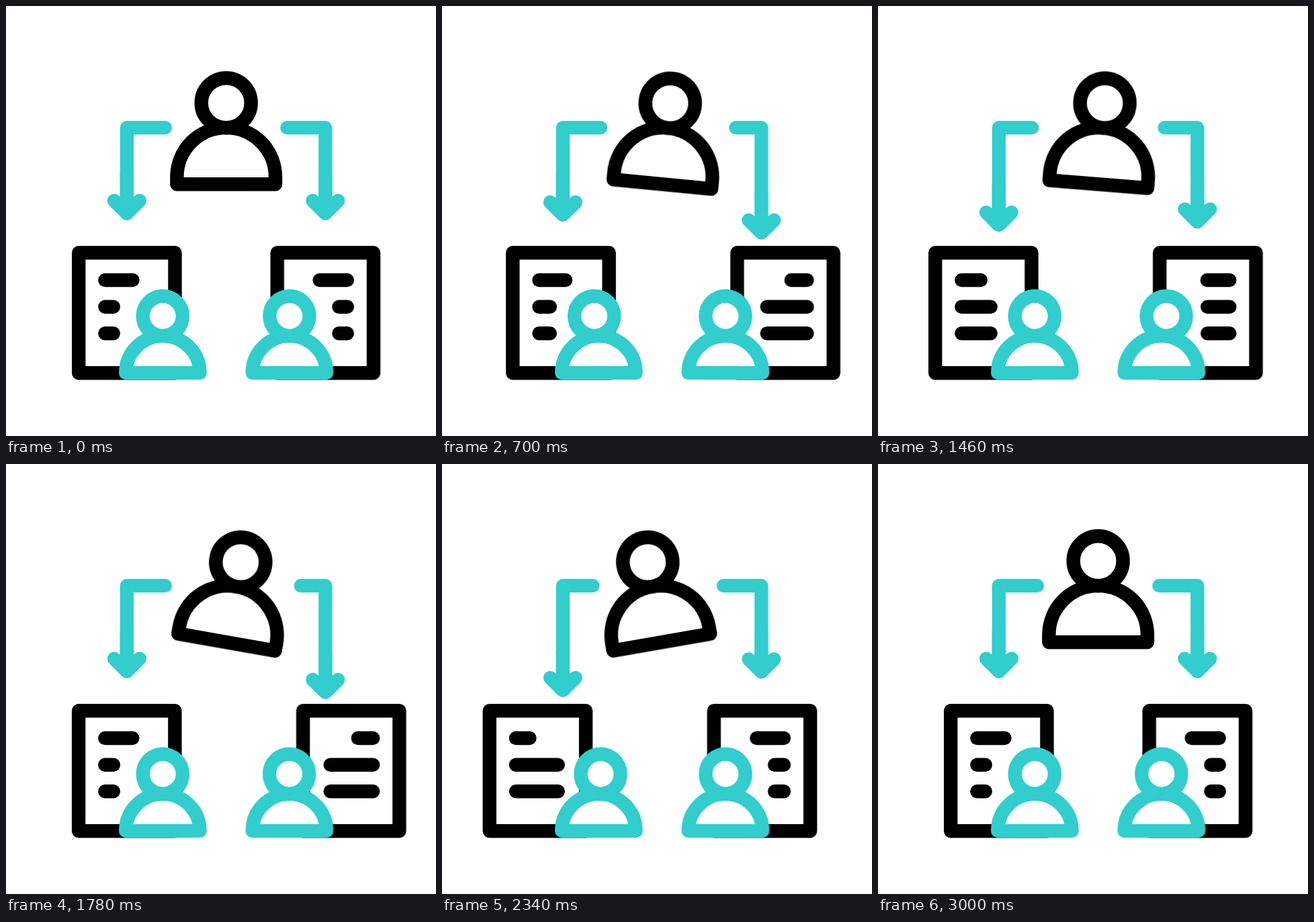
These frames come from a looping animation (640x640 px, 3020 ms). An HTML page:

```html
<!DOCTYPE html>
<html lang="en">
<head>
<meta charset="utf-8">
<title>Delegation</title>
<style>
  @property --k { syntax: "<number>"; inherits: true; initial-value: 0; }
  @property --nod { syntax: "<number>"; inherits: true; initial-value: 0; }

  html, body { margin: 0; width: 100%; height: 100%; overflow: hidden; background: #fff; }
  svg { display: block; width: 100%; height: 100%; }

  path, circle, rect {
    fill: none;
    stroke: #000;
    stroke-width: 20.4;
    stroke-linecap: round;
    stroke-linejoin: round;
  }
  .teal > * { stroke: #32cdcd; }
  .filled > * { fill: #fff; }

  /* --k: how far a side is extended, --nod: sideways shift of its head */
  .side { animation: extend 3.02s infinite, nod 3.02s infinite; }
  .side, .boss, .side * { animation-timing-function: cubic-bezier(.3333, 0, .6667, 1); }
  .left { --arm: 12.8px; --drop: 29.2px; --trim: 21.2px; --grow: 51.8px; animation-delay: -2.42s; }
  .right { --arm: 20.5px; --drop: 31.4px; --trim: 18.8px; --grow: 51.2px; }

  .panel { transform: translateX(calc(var(--k) * -38.5px)); }
  .title { stroke-dasharray: calc(41.1px - var(--k) * var(--trim)) 999px; }
  .row { stroke-dasharray: calc(12.4px + var(--k) * var(--grow)) 999px; }
  .arm { stroke-dasharray: calc(184.4px - var(--k) * var(--arm)) 999px; }
  .tip { transform: translateY(calc(var(--k) * var(--drop))); }
  .head { transform: translateX(calc(var(--nod) * 13px)); }

  .boss { transform-origin: 327.7px 269px; animation: sway 3.02s infinite; }

  /* beats fall every 600 ms, nods every 200 ms, then a 20 ms rest */
  @keyframes extend {
    0%, 39.735%, 79.47%, 100% { --k: 0; }
    19.868%, 59.603% { --k: 1; }
  }
  @keyframes nod {
    0%, 19.868%, 39.735%, 59.603%, 100% { --nod: 0; }
    6.623%, 46.358% { --nod: -1; }
    13.245%, 52.98% { --nod: 1; }
  }
  @keyframes sway {
    0%, 99.338%, 100% { transform: rotate(0deg); }
    19.868%, 59.603% { transform: rotate(10deg); }
    39.735%, 79.47% { transform: rotate(-10deg); }
  }
</style>
</head>
<body>
<svg viewBox="0 0 640 640">
  <g class="boss">
    <path d="M254.4 265.2V254.4a73.3 73.3 0 0 1 146.6 0V265.2Z"/>
    <circle cx="327.7" cy="144.2" r="37"/>
  </g>
  <g class="side left">
    <g class="teal">
      <path class="arm" d="M179.9 308.5V181.1H236.9"/>
      <path class="tip" d="M161 289.7l18.9 18.8l18.9 -18.8M179.9 308.5v-60"/>
    </g>
    <g class="panel">
      <rect x="108.2" y="367.2" width="143.3" height="179"/>
      <path class="title" d="M147.4 408h41.1"/>
      <path class="row" d="M147.4 447.7h66"/>
      <path class="row" d="M147.4 487.2h66"/>
    </g>
    <g class="teal filled">
      <path d="M178.2 546.1a55.2 55 0 0 1 110.4 0Z"/>
      <circle class="head" cx="233.3" cy="461.4" r="29.6"/>
    </g>
  </g>
</svg>
<script>
  // The right side is the mirrored left side with its own reach and timing.
  const left = document.querySelector(".left");
  const right = left.cloneNode(true);
  right.setAttribute("class", "side right");
  right.setAttribute("transform", "translate(655.3 0) scale(-1 1)");
  left.after(right);
</script>
</body>
</html>
```
